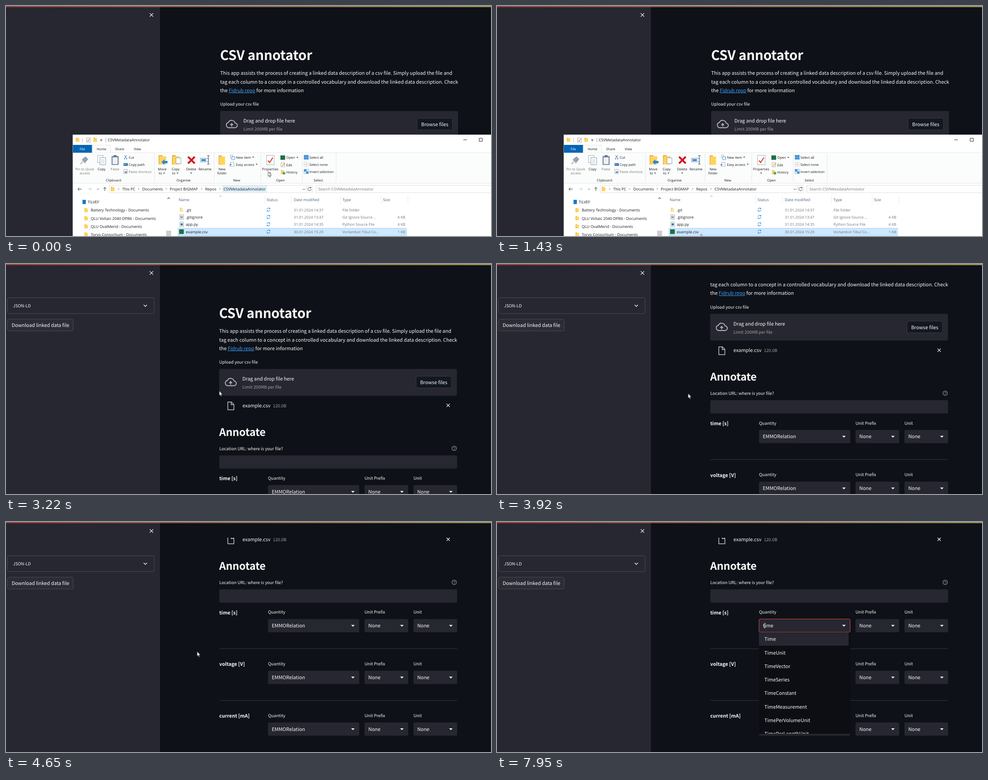
An HTML page for the animation above (8 s loop, 1087x515 px).

```html
<!DOCTYPE html>
<html lang="en">
<head>
<meta charset="utf-8">
<title>CSV annotator</title>
<style>
html, body { margin: 0; width: 100%; height: 100%; overflow: hidden; background: #0e1117; }
svg { display: block; width: 100vw; height: 100vh; }
text { text-rendering: geometricPrecision; white-space: pre; }
.app { font: 10.91px "Noto Sans CJK JP", "Noto Sans CJK SC", "Noto Sans CJK", sans-serif; fill: #fafafa; }
.app .small { font-size: 9.52px; }
.app .dim { fill: #a0a1a7; }
.app .bold { font-weight: 700; }
.app .h1 { font-size: 29.8px; font-weight: 700; letter-spacing: -.005em; }
.app .h2 { font-size: 23.5px; font-weight: 600; letter-spacing: -.005em; }
.app .link { fill: #3d9df3; text-decoration: underline; }
.ui { font: 8.65px "Open Sans", "Noto Sans", sans-serif; fill: #1b1b1b; }
.ui .rib { font-size: 7.6px; }
.ui .row { font-size: 8.4px; }
.ui .mid { text-anchor: middle; }
.ui .end { text-anchor: end; }
.ui .grey { fill: #747474; }
.ui .head { fill: #4c607a; }
.ui .white { fill: #fff; }

/* percentages of the 8 s loop */
#crumb, #explorer, #ghost, #copy, #arrow, #beam, #results, #panel, #marked, #menu, .key, #caret {
  animation: 8s step-end infinite;
}
#crumb { animation-name: until-270; }
#explorer { animation-name: until-2930; }
#ghost { animation-name: drag; }
#copy { animation-name: copy; }
#arrow { animation-name: until-5600; }
#beam { animation-name: from-5600; }
#results, #panel { animation-name: from-3070; }
#marked { animation-name: marked; }
#menu { animation-name: from-6810; }
.key { animation-name: from-6810; }
.key:nth-child(2) { animation-name: from-6950; }
.key:nth-child(3) { animation-name: from-7090; }
.key:nth-child(4) { animation-name: from-7240; }
#caret { animation-name: caret; }
@keyframes until-270 { 0% { visibility: visible } 3.375%, 100% { visibility: hidden } }
@keyframes until-2930 { 0% { visibility: visible } 36.625%, 100% { visibility: hidden } }
@keyframes until-5600 { 0% { visibility: visible } 70%, 100% { visibility: hidden } }
@keyframes from-3070 { 0% { visibility: hidden } 38.4%, 100% { visibility: visible } }
@keyframes from-5600 { 0% { visibility: hidden } 70%, 100% { visibility: visible } }
@keyframes from-6810 { 0% { visibility: hidden } 85.125%, 100% { visibility: visible } }
@keyframes from-6950 { 0% { visibility: hidden } 86.875%, 100% { visibility: visible } }
@keyframes from-7090 { 0% { visibility: hidden } 88.625%, 100% { visibility: visible } }
@keyframes from-7240 { 0% { visibility: hidden } 90.5%, 100% { visibility: visible } }
@keyframes drag { 0% { visibility: hidden } 19.53% { visibility: visible } 36.625%, 100% { visibility: hidden } }
@keyframes copy { 0% { visibility: hidden } 31.375% { visibility: visible } 36.625%, 100% { visibility: hidden } }
@keyframes marked { 0% { visibility: hidden } 73.5% { visibility: visible } 85.125%, 100% { visibility: hidden } }
@keyframes caret { 0% { visibility: hidden } 90.5% { visibility: visible } 99.375%, 100% { visibility: hidden } }

#page { animation: scroll 8s infinite; }
@keyframes scroll {
  0% { transform: translate(0, 0); animation-timing-function: step-end }
  38.4% { transform: translate(-2.3px, 0); animation-timing-function: step-end }
  43.7% { transform: translate(-2.3px, 0); animation-timing-function: steps(4, jump-start) }
  50.75% { transform: translate(-2.3px, -123.5px); animation-timing-function: steps(5, jump-start) }
  59.97%, 100% { transform: translate(-2.3px, -277.7px) }
}
#cursor { animation: point 8s infinite; }
@keyframes point {
  0% { transform: translate(587.5px, 371px); animation-timing-function: step-end }
  1.5% { transform: translate(587.5px, 371px); animation-timing-function: steps(7, jump-start) }
  14.625% { transform: translate(450px, 509px); animation-timing-function: step-end }
  17.875% { transform: translate(457px, 510.5px); animation-timing-function: step-end }
  19.53% { transform: translate(457px, 510.5px); animation-timing-function: steps(7, jump-start) }
  31.16% { transform: translate(624px, 271px); animation-timing-function: step-end }
  31.375% { transform: translate(624px, 271px); animation-timing-function: steps(2, jump-start) }
  34.625% { transform: translate(627px, 266.5px); animation-timing-function: step-end }
  36.625% { transform: translate(627px, 266.5px); animation-timing-function: steps(4, jump-start) }
  43.7% { transform: translate(428.3px, 290px); animation-timing-function: step-end }
  63.625% { transform: translate(428.3px, 290px); animation-timing-function: steps(5, jump-start) }
  71.6% { transform: translate(679px, 240px); animation-timing-function: step-end }
  73.5% { transform: translate(679px, 240px); animation-timing-function: steps(6, jump-start) }
  83.4%, 100% { transform: translate(600px, 232px) }
}
#select { transform-origin: 670px 0; animation: select 8s infinite; }
@keyframes select {
  0% { transform: scaleX(0) }
  73.5% { transform: scaleX(0); animation-timing-function: steps(6, jump-start) }
  83.4%, 100% { transform: scaleX(1) }
}
</style>
</head>
<body>
<svg id="stage" viewBox="0 0 1087 515" preserveAspectRatio="none"></svg>
<script>
const PANEL = '#262730', BACK = '#0e1117', BLUE = '#1a7fd0';
const text = (x, y, s, cls = '') => `<text x="${x}" y="${y}" class="${cls}">${s}</text>`;
const rect = (x, y, w, h, fill, more = '') =>
  `<rect x="${x}" y="${y}" width="${w}" height="${h}" fill="${fill}" ${more}/>`;
const line = (d, color, w = 1, fill = 'none') =>
  `<path d="${d}" fill="${fill}" stroke="${color}" stroke-width="${w}"/>`;
const fill = (d, color) => `<path d="${d}" fill="${color}"/>`;
const box = (x, y, w, h, color = PANEL, edge = 'none') => rect(x, y, w, h, color, `rx="3" stroke="${edge}"`);
const cross = (x, y, r, color = '#fafafa', w = 1.3) =>
  line(`M${x - r} ${y - r}l${2 * r} ${2 * r}m0 ${-2 * r}l${-2 * r} ${2 * r}`, color, w);
const caretDown = (x, y, r, color) => fill(`M${x - r} ${y}h${2 * r}l${-r} ${r}z`, color);
const chevron = (x, y) => line(`M${x - 1.2} ${y - 2.4}l2.4 2.4-2.4 2.4`, '#666', .8);
const folder = (x, y, w, h, color = '#ffd45e') =>
  rect(x, y, w * .5, h, '#e9b23c') + rect(x + w * .1, y + h * .12, w * .9, h * .88, color);
const sheet = (x, y, w, h, edge = '#8a97a8') => rect(x, y, w, h, '#fff', `stroke="${edge}" stroke-width=".8"`);
const sync = (x, y) => line(`M${x - 3.6} ${y - .6}a3.7 3.7 0 0 1 6.8-1.4v-2.2m0 2.2h-2.4` +
  `M${x + 3.6} ${y + .6}a3.7 3.7 0 0 1-6.8 1.4v2.2m0-2.2h2.4`, BLUE, 1);
const tick = (x, y, s) => line(`M${x} ${y}l${s * .35} ${s * .4} ${s * .65}-${s}`, '#d8512c', s * .22);

function dropdown(x, y, w, label, value) {
  return text(x, y - 12, label, 'small') + box(x, y, w, 29.7) +
    text(x + 8.5, y + 18.9, value) + caretDown(x + w - 14.2, y + 13.2, 4, '#fafafa');
}

function column(name, i) {
  const y = 495 + i * 115.7;
  return text(480.3, y - 10.6, name, 'bold') +
    dropdown(589.5, y, 204.5, 'Quantity', 'EMMORelation') +
    dropdown(805.8, y, 98, 'Unit Prefix', 'None') +
    dropdown(915.5, y, 98, 'Unit', 'None') +
    (i < 2 ? rect(480.3, y + 66, 533, .9, '#3b3e45') : '');
}

const uploader = text(480, 223.3, 'Upload your csv file', 'small') + box(480, 235, 533, 60) +
  line('M499 272.5a6 6 0 0 1-.5-11.8a8 8 0 0 1 15 1.4a5.2 5.2 0 0 1-.5 10.4z', '#b4b9c6', 1.9) +
  line('M505.8 270v-6m-3.3 2.6l3.3-3.3 3.3 3.3', '#b4b9c6', 1.8) +
  text(532, 261, 'Drag and drop file here') + text(532, 279, 'Limit 200MB per file', 'small dim') +
  box(921.5, 251.5, 79, 26, '#131720', '#363942') + text(930.5, 269, 'Browse files');

const results = line('M499.5 309h8l5.5 5.5v12h-13.5zM507 309v6h6', '#c3c6cf', 1.5) +
  text(532.3, 320.7, 'example.csv') + text(600.5, 320.7, '120.0B', 'small dim') + cross(993.3, 316.5, 3.6) +
  text(480, 384.7, 'Annotate', 'h2') + text(480.3, 416.6, 'Location URL: where is your file?', 'small') +
  '<circle cx="1006.8" cy="412.7" r="5" fill="none" stroke="#a5a6ab" stroke-width="1.1"/>' +
  line('M1005.2 411.6a1.6 1.6 0 1 1 2.4 1.4q-.8.4-.8 1.1m0 .8v1', '#a5a6ab', 1) +
  box(480.3, 428.5, 533, 29.8) +
  ['time [s]', 'voltage [V]', 'current [mA]'].map(column).join('');

const page = `<g clip-path="url(#below)"><g id="page">` +
  text(479.7, 121, 'CSV annotator', 'h1') +
  text(480, 154.2, 'This app assists the process of creating a linked data description of a csv file. Simply upload the file and') +
  text(480, 173.5, 'tag each column to a concept in a controlled vocabulary and download the linked data description. Check') +
  text(480, 192.8, 'the <tspan class="link">Fidrub repo</tspan> for more information') +
  uploader + `<g id="results">${results}</g></g></g>`;

const sidebar = rect(0, 0, 345, 515, PANEL) + cross(326, 20, 3.9) +
  `<g id="panel">` + box(3.5, 75.5, 328.5, 35.5, PANEL, '#4b4c55') + text(15.8, 96.7, 'JSON-LD', 'small') +
  line('M308.5 91.4l3.7 3.7 3.7-3.7', '#fafafa', 1.4) +
  box(3.5, 123.5, 147, 26.5, '#2b2c35', '#4b4c55') + text(12.8, 141, 'Download linked data file') + '</g>';

const options = ['', 'Unit', 'Vector', 'Series', 'Constant', 'Measurement', 'PerVolumeUnit', 'PerLengthUnit'];
const picker = `<g id="marked"><g id="select">${rect(596, 223.5, 74, 17, '#0b469f')}</g>` +
  text(595.7, 236.2, 'EMMORelation') + '</g>' +
  `<g id="menu">` + box(587.2, 217.2, 204.3, 29.6, PANEL, '#e0484b') + caretDown(777.5, 230.3, 4, '#fafafa') +
  text(596, 236.2, [...'time'].map(c => `<tspan class="key">${c}</tspan>`).join('')) +
  rect(587, 247.3, 205, 227, '#0c0e13') + rect(587, 247.3, 201, 29.7, PANEL) +
  `<g clip-path="url(#list)">` +
  options.map((name, i) => text(599.3, 266.3 + i * 30.25, 'Time' + name)).join('') + '</g></g>' +
  rect(618.2, 224, .9, 15, '#fafafa', 'id="caret"');

const titleBar = folder(156.5, 295, 8, 9) + rect(171.5, 295, .7, 10, '#999') +
  sheet(180.5, 295.5, 8.5, 9.5) + tick(182.3, 300.5, 5) + folder(196, 295, 8, 9) +
  rect(211, 298.4, 5, .8, '#333') + caretDown(213.5, 300.4, 2.4, '#333') + rect(223.5, 295, .7, 10, '#777') +
  text(228, 303.2, 'CSVMetadataAnnotator') + line('M1025 299.7h8', '#222') +
  line('M1060.5 296h7v7h-7z', '#222');

const tabs = rect(150, 328, 937, 69, '#fbfcfc') + rect(150, 328, 937, .8, '#e2e3e4') + rect(150, 396.5, 937, .8, '#dcdddd') +
  rect(150, 311, 43, 17.5, '#0565b5') + line('M193 328.5V311.5h41.5v17', '#dcdddd', .8, '#fbfcfc') +
  text(171, 322.5, 'File', 'rib mid white') +
  text(214, 322.5, 'Home', 'rib mid') + text(255, 322.5, 'Share', 'rib mid') + text(294.5, 322.5, 'View', 'rib mid') +
  [333, 466.5, 571, 664, 740].map(x => rect(x - .4, 331, .8, 63, '#dedfe0')).join('');

const big = (x, a, b = '', cls = '') => text(x, 367.5, a, 'rib mid ' + cls) + text(x, 377.3, b, 'rib mid ' + cls);
const small = (x, row, s, cls = '') => text(x, 342 + row * 15.9, s, 'rib ' + cls);
const group = (x, s) => text(x, 392.6, s, 'rib mid');

const ribbon = line('M167 354l5-5m-2-5l8 8m-6-9l6-5 5 5-5 6z', '#8a96a5', 1.6, '#9aa5b3') +
  big(176.5, 'Pin to Quick', 'access', 'grey') +
  sheet(205.5, 334.5, 12, 16) + sheet(210.5, 339.5, 13, 16, '#6c87a8') +
  line('M213 344h8m-8 3h8m-8 3h8m-8 3h5', '#9db6d4', .8) + big(214, 'Copy') +
  rect(236.5, 336, 16, 20, '#7f92aa') + rect(239, 339, 11, 15, '#edf1f6') + rect(241, 334, 7, 4, '#66788f') + big(244, 'Paste', '', 'grey') +
  line('M265.5 334l5 7m0-7l-5 7', '#53657a') + line('M265 342.3h2m2.5 0h2', BLUE, 2) + small(275, 0, 'Cut') +
  rect(263.5, 352, 9.5, 6, '#2d6fae') + line('M265 354l1 2 1-2 1 2m1.5-2l1 2', '#fff', .7) + small(275, 1, 'Copy path') +
  sheet(264, 366, 8, 9) + rect(266, 370, 5, 4, '#7d97b4') + small(275, 2, 'Paste shortcut', 'grey') + group(241, 'Clipboard') +
  folder(342, 334, 17, 21) + fill('M362 347h-7v-3.5l-6.5 6 6.5 6v-3.5h7z', '#2585da') +
  big(350, 'Move') + text(346, 377.3, 'to', 'rib mid') + caretDown(354.3, 373.3, 2.3, '#333') +
  folder(372, 334, 17, 21) + sheet(381, 340, 11, 13, '#6c87a8') + big(380, 'Copy') +
  text(376, 377.3, 'to', 'rib mid') + caretDown(384.3, 373.3, 2.3, '#333') +
  cross(415.5, 345, 7.5, '#d1171c', 4) + big(415, 'Delete') + caretDown(415, 373.3, 2.3, '#333') +
  rect(436, 341, 17, 8, '#fff', 'stroke="#6e8eaf"') + rect(438, 342.8, 10, 4.5, '#2d88d8') +
  line('M450.5 335h6m-3 0v19m-3 0h6', '#444') + big(446, 'Rename') + group(398, 'Organise') +
  folder(476.5, 334.5, 14.5, 21) + big(484, 'New', 'folder') +
  sheet(503, 334, 5, 6) + sheet(506, 337.5, 6.5, 6.5, BLUE) + small(515.5, 0, 'New item') + caretDown(554, 337.5, 2.3, '#333') +
  sheet(503.5, 350, 7.5, 9) + line('M501 357l4-3', BLUE, 1.8) + small(515.5, 1, 'Easy access') + caretDown(561.8, 353.5, 2.3, '#333') + group(517, 'New') +
  sheet(584, 334.5, 17, 21) + tick(587, 346, 11) + big(592, 'Properties') + caretDown(592, 373.3, 2.3, '#333') +
  rect(615, 334.5, 10.5, 10, '#1d7044') + small(628, 0, 'Open') + caretDown(653, 338, 2.3, '#333') +
  sheet(616.5, 351, 8, 9) + line('M619 358l6-6', '#e9ab37', 1.8) + small(628, 1.04, 'Edit') +
  folder(616.5, 367.5, 7, 9) + '<circle cx="623" cy="374.5" r="3" fill="#5aa65c"/>' + small(628, 2.08, 'History') + group(615, 'Open') +
  [0, 1, 2].map(row => [0, 1, 2, 3].map(k => {
    const on = row == 0 || (row == 2 && k % 3 == 0);
    return rect(668 + k % 2 * 5.4, 334 + row * 15.9 + (k >> 1) * 5.2, 4.4, 4.2, on ? '#3d93dc' : '#fff',
      `stroke="${row == 1 ? '#999' : '#2f7fc4'}" stroke-width=".6" ${row == 1 ? 'stroke-dasharray="1 .8"' : ''}`);
  }).join('') + small(680, row, ['Select all', 'Select none', 'Invert selection'][row])).join('') + group(700, 'Select');

const address = line('M169.5 410h-8.5m3.4-3.4l-3.4 3.4 3.4 3.4', '#333') + line('M183 410h8.5m-3.4-3.4l3.4 3.4-3.4 3.4', '#c2c2c2') +
  line('M204 409l2.2 2.2 2.2-2.2', '#555') + line('M221.5 414v-8m-3.4 3.4l3.4-3.4 3.4 3.4', '#333') +
  line('M231.5 401.5h455.5v16.5h-455.5zM673.5 401.5v16.5', '#dadada', .9) + line('M1088 401.5H694.5v16.5h394', '#dadada', .9) +
  rect(485, 402, 100, 15.5, '#def0fb', 'id="crumb"') + folder(235, 405, 8, 9.5) +
  [252.5, 297, 359, 438.5, 479.5].map(x => chevron(x, 409.5)).join('') +
  [[260.5, 'This PC'], [305.5, 'Documents'], [367, 'Project BIGMAP'], [446.5, 'Repos'], [487.5, 'CSVMetadataAnnotator']]
    .map(([x, s]) => text(x, 412.8, s)).join('') +
  line('M665 409l2.8 2.8 2.8-2.8', '#444') + line('M683.3 407.2a3.9 3.9 0 1 0 1 3m-.6-5.2v2.6h-2.6', '#444') +
  text(700, 413, 'Search CSVMetadataAnnotator', 'grey');

const tree = rect(171.5, 434, 7.5, 9.5, '#1779c4') + text(183, 442.3, 'TILVEF') +
  ['Battery Technology', 'QLU Voltaic 2040 DPB6', 'QLU OvalMerid', 'Torvo Consortium']
    .map((s, i) => folder(176, 452.5 + i * 18.2, 7.5, 9) + text(190, 460.4 + i * 18.2, s + ' - Documents')).join('') +
  line('M361.7 431.8l2.8-2.8 2.8 2.8', '#444', 1.1) + rect(359, 503, 11, 12, '#cdcdcd');

const files = [
  ['.git', '31.01.2024 14:37', 'File folder', ''],
  ['.gitignore', '31.01.2024 13:47', 'Git Ignore Source ...', '4 KB'],
  ['app.py', '31.01.2024 14:35', 'Python Source File', '4 KB'],
  ['example.csv', '30.01.2024 15:29', 'Vorlambot Tibul Co...', '1 KB']];
const icons = [
  folder(390, 452, 7, 9, '#fbe6a8'),
  sheet(389.5, 467.5, 8.5, 10) + '<circle cx="393.7" cy="472.5" r="2" fill="none" stroke="#555" stroke-width="1.2"/>',
  sheet(389.5, 484, 8.5, 10) + rect(391.3, 486.5, 5, 5, '#3b75a8'),
  rect(388, 500, 10.5, 10.5, '#1d7044')];
const list = [[387, 'Name'], [584, 'Status'], [645, 'Date modified'], [754, 'Type'], [845, 'Size']]
    .map(([x, s]) => text(x, 437.2, s, 'head')).join('') +
  [579.5, 639.5, 749.5, 840.5, 900.5].map(x => rect(x, 424, .8, 19, '#e3e3e3')).join('') +
  line('M478 427l2.6-2.4 2.6 2.4', '#777', .8) +
  rect(385.4, 497.4, 512.4, 16.6, '#cce8ff', 'stroke="#9ad0f8" stroke-width=".8"') +
  files.map(([name, date, type, size], i) => {
    const y = 459.6 + i * 16.4;
    return icons[i] + text(403, y, name) + sync(588.2, y - 3.6) + text(645, y, date, 'row grey') +
      text(754, y, type, 'row grey') + text(895, y, size, 'row grey end');
  }).join('');

const cursor = `<g id="cursor"><g id="ghost">${rect(-39, -70, 78, 78.5, '#8ca5b0', 'fill-opacity=".45"')}</g>` +
  `<g id="copy" class="ui">${rect(8.7, 10, 41, 14.5, '#fff', 'stroke="#8b8b8b" stroke-width=".8"')}` +
  line('M12 17.2h8m-4-4v8', '#1d4fa8', 1.3) + '<text x="23.5" y="20.4" fill="#2446a0">Copy</text></g>' +
  `<g id="arrow">${line('M0 0V10.6L2.4 8.4 4 12.2 5.7 11.4 4.1 7.8H7.4Z', '#111', .7, '#fff')}</g>` +
  `<g id="beam">${line('M-1.7-5h3.4M0-5v10m-1.7 0h3.4', '#d9dbe0', .9)}</g></g>`;

const clip = (id, x, y, w, h) => `<clipPath id="${id}">${rect(x, y, w, h, '#000')}</clipPath>`;

document.getElementById('stage').innerHTML = '<defs>' +
  '<linearGradient id="glow"><stop stop-color="#d2504f"/><stop offset="1" stop-color="#e6dd78"/></linearGradient>' +
  clip('below', 345, 35, 742, 480) + clip('list', 587, 247, 205, 227) + '</defs>' +
  rect(0, 0, 1087, 515, BACK) +
  `<g class="app">${page}${sidebar}${rect(0, .6, 1087, 1.6, 'url(#glow)')}${picker}</g>` +
  `<g id="explorer" class="ui">${rect(149.5, 288, 938, 227, '#fff')}${titleBar}${tabs}${ribbon}${address}${tree}${list}</g>` +
  cursor;
</script>
</body>
</html>
```
